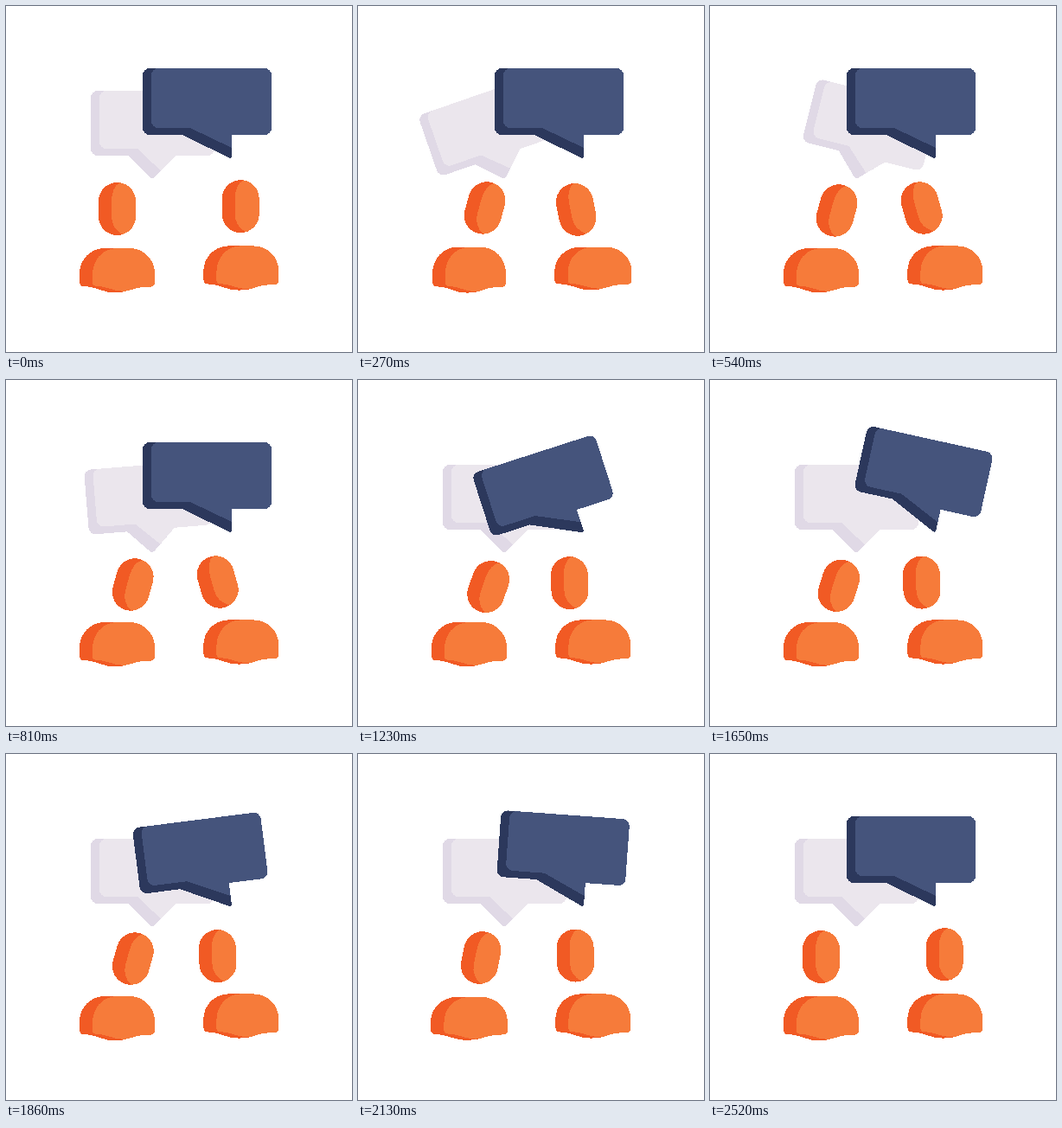
Write an HTML page that moves like this. It is 400 px wide and 400 px high and loops after 3550 ms.

```html
<!DOCTYPE html>
<html lang="en">
<head>
<meta charset="utf-8">
<title>Two people talking</title>
<style>
  html, body { margin: 0; width: 100%; height: 100%; overflow: hidden; background: #fff; }
  svg { display: block; width: 100%; height: 100%; shape-rendering: crispEdges; }
  .shade { fill: #f15a24; }
  .skin { fill: #f67b3a; }
</style>
</head>
<body>
<svg viewBox="0 0 400 400">
  <defs>
    <g id="head">
      <rect class="shade" x="-21.5" y="-30.5" width="43" height="61" rx="21.5"/>
      <path class="skin" d="M3-30.3C-3-27-6.5-19-6.5-9V9C-6.5 18-2 25 6 29.600A21.5 21.5 0 0 0 21.5 9V-9A21.5 21.5 0 0 0 3-30.3Z"/>
    </g>
    <g id="body">
      <path class="shade" d="M85 318V309C85 293 98 280 114 280H143C159 280 172 293 172 309V320Q172 324 168 324.500C160 325 153 325 145 328C135 332 120 332.500 110 328.500C102 325.500 97 324.500 89 324Q85 323.500 85 318Z"/>
      <path class="skin" d="M127 280H143C159 280 172 293 172 309V320Q172 324 168 324.500C160 325 153 325 145 328Q141 329.500 136 330C122 329 116 324 103 323.500Q100 323 100 319V311C100 294 111 281 127 280Z"/>
    </g>
  </defs>
  <g id="pale">
    <path fill="#e0d9e6" d="M106 98H233A8 8 0 0 1 241 106V165A8 8 0 0 1 233 173H197L171.500 198Q169 200 166.500 198L142 173H106A8 8 0 0 1 98 165V106A8 8 0 0 1 106 98Z"/>
    <path fill="#ebe6ed" d="M116 98H233A8 8 0 0 1 241 106V165A8 8 0 0 1 233 173H197L179 190.500L152 165H116A8 8 0 0 1 108 157V106A8 8 0 0 1 116 98Z"/>
  </g>
  <g id="navy">
    <path fill="#2c385c" d="M166 72H299A8 8 0 0 1 307 80V141A8 8 0 0 1 299 149H261V173.500Q261 177 257.500 175.300L204 149H166A8 8 0 0 1 158 141V80A8 8 0 0 1 166 72Z"/>
    <path fill="#45547c" d="M176 72H299A8 8 0 0 1 307 80V141A8 8 0 0 1 299 149H261V164L213 141H176A8 8 0 0 1 168 133V80A8 8 0 0 1 176 72Z"/>
  </g>
  <use href="#body" id="bodyL"/>
  <use href="#body" id="bodyR"/>
  <use href="#head" id="headL"/>
  <use href="#head" id="headR"/>
</svg>
<script>
const LOOP = 3550, STEP = 30, LAST = 2520;
const SWING = [[0, 0], [210, -22], [540, 14], [720, -9.5], [960, 6], [1200, 0]];

const span = (t, from, to) => Math.min(1, Math.max(0, (t - from) / (to - from)));
const ease = (t, from, to) => (1 - Math.cos(Math.PI * span(t, from, to))) / 2;
const hump = (t, from, to) => Math.sin(Math.PI * span(t, from, to));

// A bubble rocks on its tip with shrinking swings
const rock = t => SWING.reduce((angle, [end, goal], i) =>
  i ? angle + (goal - SWING[i - 1][1]) * ease(t, SWING[i - 1][0], end) : goal, 0);

// A body is first pressed flat, then stretched
const wobble = (t, from) => -0.03 * Math.sin(2 * Math.PI * span(t, from, from + 360));

const move = (id, value) => document.getElementById(id).setAttribute("transform", value);
const squash = (w, x, y) =>
  `translate(${x + 128.5} ${y + 318}) scale(${1 - w * 0.8} ${1 + w}) translate(-128.5 -318)`;

function draw(t) {
  const back = ease(t, 1950, 2490);
  const leftOut = ease(t, 0, 270) - back;
  const rightOut = ease(t, 0, 420) - back;
  const nod = hump(t, 750, 1950) ** 2;
  const hop = hump(t, 0, 540);
  const tilt = -2 * rightOut - 14 * (ease(t, 0, 420) - ease(t, 900, 1200));

  move("pale", `rotate(${rock(t)} 169 198)`);
  move("navy", `rotate(${rock(t - 1080)} 260 175)`);
  move("bodyL", squash(wobble(t, 0) + wobble(t, 2070), 0, 0));
  move("bodyR", squash(wobble(t, 180) + wobble(t, 1950), 143.3, -2.6));
  move("headL", `translate(128.5 ${302.5 - 0.5 * leftOut + 1.5 * nod - 3 * hop})
    rotate(${15.4 * leftOut + 4 * nod}) translate(0 -68)`);
  move("headR", `translate(${271.2 - 26.5 * rightOut} ${231.7 + 1.8 * rightOut + 1.2 * nod + 2.4 * hop})
    rotate(${tilt})`);
}

const start = performance.now();
function tick() {
  const t = (performance.now() - start) % LOOP;
  draw(Math.min(LAST, Math.floor(t / STEP) * STEP));
  requestAnimationFrame(tick);
}
tick();
</script>
</body>
</html>
```
